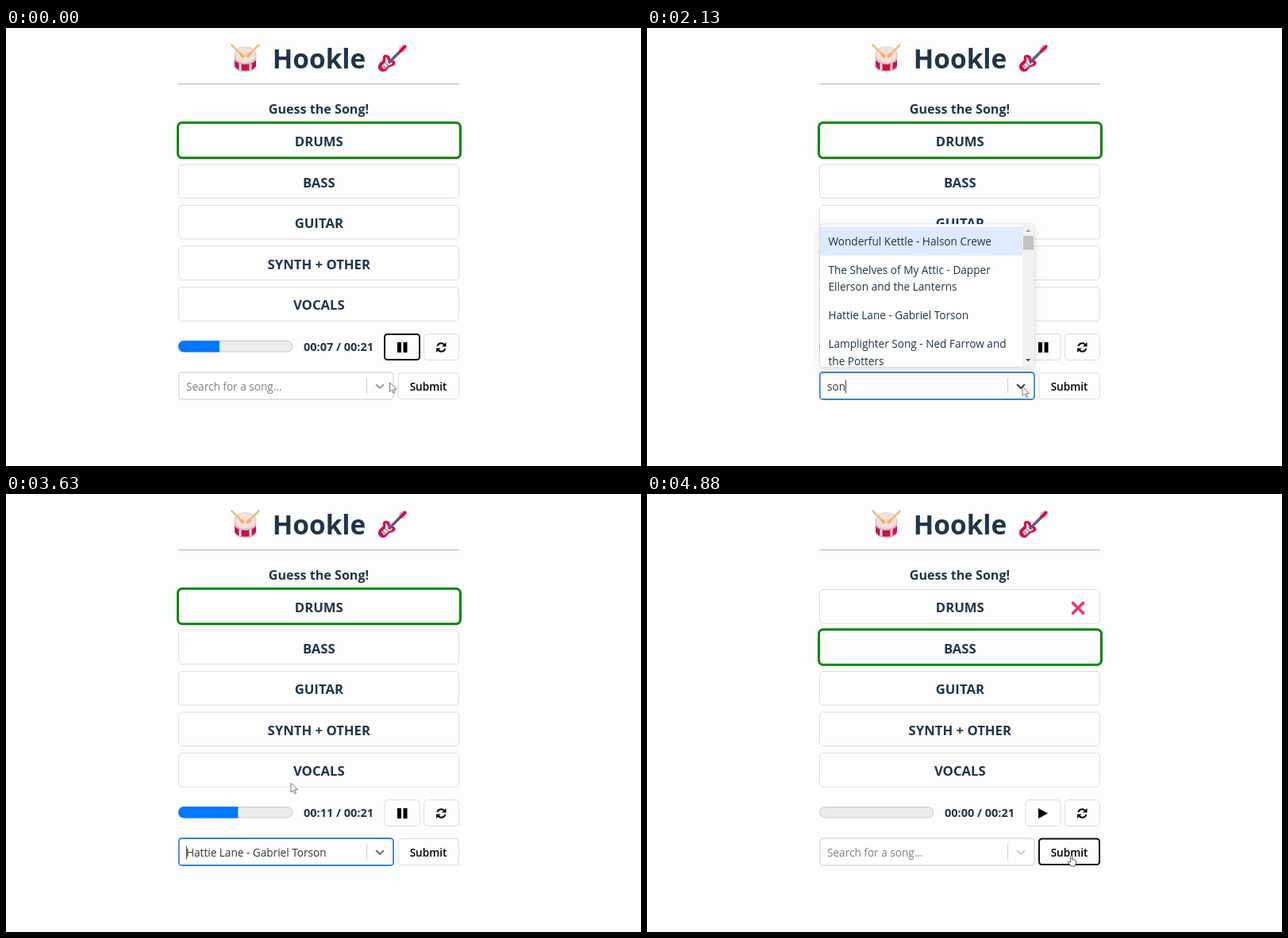
These frames come from a looping animation (800x552 px, 5.01 s). An HTML page:

```html
<!DOCTYPE html>
<html lang="en">
<head>
<meta charset="utf-8">
<title>Guess the Song</title>
<style>
  html, body { margin: 0; width: 100%; height: 100%; overflow: hidden; background: #fdfdfd; }
  svg { display: block; width: 800px; height: 552px; }
  text { font: 13.6px "Open Sans", "Noto Sans", sans-serif; fill: #213547; white-space: pre; }
  .mid { text-anchor: middle; }
  .title { font-size: 33.4px; font-weight: 700; }
  .sub { font-size: 16.1px; font-weight: 700; }
  .track { font-size: 16.7px; font-weight: 700; }
  .clock { font-size: 14.5px; font-weight: 700; }
  .submit { font-weight: 600; fill: #000; }
  .box { fill: #fdfdfd; stroke: #dedede; }
  .ring { fill: none; stroke: #0b860b; stroke-width: 3; }
  .focus { fill: none; stroke: #101010; stroke-width: 2; }
  .menu { fill: #fdfdfd; stroke: #00000018; filter: drop-shadow(0 3.6px 5px #0000001c); }
  .line { fill: none; stroke-linecap: round; stroke-linejoin: round; }
</style>
</head>
<body>
<svg viewBox="0 0 800 552">
  <defs>
    <clipPath id="barClip"><rect x="217" y="394" width="144.5" height="14.5" rx="7.2"/></clipPath>
    <clipPath id="listClip"><rect x="218" y="247" width="270" height="180.5" rx="3.6"/></clipPath>
    <g id="halfSync">
      <path d="M-5-1.4A5 5 0 0 1 3.6-3.5" fill="none" stroke="#000" stroke-width="2"/>
      <path d="M6.2-6.4V-.9H.7z"/>
    </g>
  </defs>

  <g id="drum">
    <path d="M288 36v12c2 9.5 25 9.5 27 0V36z" fill="#cd1144"/>
    <path d="M293.500 44l3 1.500v8l-3-1zM309.500 44l-3 1.500v8l3-1z" fill="#f6e4e6"/>
    <path d="M287.500 36v3c3 9 25 9 28 0v-3z" fill="#c6bfd0"/>
    <ellipse cx="301.5" cy="34" rx="14" ry="11" fill="#d6ccd6"/>
    <ellipse cx="301.5" cy="33.5" rx="12.5" ry="10" fill="#f6dfd9"/>
    <path d="M288 49c3 7.5 24 7.5 27 0" fill="none" stroke="#dccfd6" stroke-width="1.8"/>
    <path class="line" d="M284.500 21.500l13 13M318.500 21.500l-13 13" stroke="#f0bc80" stroke-width="2.6"/>
    <path class="line" d="M296.500 33.500l2 2M306.500 33.500l-2 2" stroke="#f3b068" stroke-width="4"/>
  </g>

  <g id="guitar">
    <path d="M480 34c-4-1-6 2-5 5 0 2-2 3-4 5-4 4-2 11 4 11 3 0 5-2 7-5 2-2 5-1 7-3 3-2 1-6-1-6-2 1-4 0-4-2 0-3-1-4-4-5z" fill="#d0124a"/>
    <path d="M478 37c2 0 3 2 3 4l6 3c-1 3-5 2-7 5l-4 3-3-4 5-5z" fill="#f3e1ea"/>
    <path d="M475 47l4 4M478 44l4 4" stroke="#8d7f9c" stroke-width="1.3"/>
    <path d="M482 44L498 28" stroke="#62527c" stroke-width="3.8"/>
    <path d="M482 43.500L498 27.500" stroke="#9a8caf" stroke-width=".8" stroke-dasharray="1.2 1.5"/>
    <path class="line" d="M497.500 28.500l5-5" stroke="#d0124a" stroke-width="4.4"/>
    <path class="line" d="M495.500 25.500l4.500-4M500.500 30.500l4-4.500" stroke="#6e6283" stroke-dasharray=".8 1.6"/>
  </g>

  <text class="mid title" x="394.5" y="50.7">Hookle</text>
  <path d="M217 70.500h354" stroke="#b5b5b5"/>
  <text class="mid sub" x="394" y="108.3">Guess the Song!</text>

  <g id="tracks"></g>
  <rect class="ring" id="ring" x="216.5" width="356" height="44.5" rx="5.5"/>
  <path id="cross" class="line" d="M536.500 137.300l13 13m0-13l-13 13" stroke="#ee3468" stroke-width="3.6"/>

  <g clip-path="url(#barClip)">
    <path d="M217 394h145v15h-145z" fill="#ececec"/>
    <rect x="217.5" y="394.5" width="143.5" height="13.5" rx="6.7" fill="none" stroke="#c6c6c6"/>
    <rect id="bar" x="217" y="394" height="15" fill="#0078fb"/>
  </g>
  <text class="clock" id="clock" x="375" y="406.7"></text>
  <rect class="box" x="477" y="385.5" width="44" height="33" rx="4"/>
  <rect class="focus" id="pauseFocus" x="477" y="386" width="44" height="32" rx="3.5"/>
  <path id="pause" d="M493 396h5v13h-5zM500.500 396h5v13h-5z"/>
  <path id="play" d="M493 396l12 6.500-12 6.500z"/>
  <rect class="box" x="526.5" y="385.5" width="44" height="33" rx="4"/>
  <use href="#halfSync" x="548.3" y="402.5"/>
  <use href="#halfSync" transform="translate(548.3 402.5) rotate(180)"/>

  <rect id="field" x="217.8" y="434" width="270.2" height="34" rx="3.6" fill="#fdfdfd"/>
  <path d="M454.500 441.500v19" stroke="#ccc"/>
  <path id="chevron" class="line" d="M466.700 449.700l4.300 4.200 4.300-4.200" stroke-width="2"/>
  <text id="entry" x="227" y="456.7"></text>
  <path id="caret" d="M.5 443.500v17" stroke="#444"/>
  <rect class="box" id="submit" x="494" y="434.5" width="76.5" height="33" rx="4"/>
  <text class="mid submit" x="532" y="457">Submit</text>
  <rect class="focus" id="submitFocus" x="494" y="434.5" width="76" height="32.5" rx="3.5"/>

  <g id="hint">
    <rect class="menu" x="217.5" y="383" width="271" height="44.5" rx="3.6"/>
    <text class="mid" x="353" y="410.7" style="fill:#999">Keep Typing!</text>
  </g>
  <g id="list">
    <rect class="menu" x="217.5" y="247" width="270.5" height="180.5" rx="3.6"/>
    <g clip-path="url(#listClip)">
      <rect id="hover" x="218" width="255" fill="#deeaff"/>
      <g id="options"></g>
      <path d="M473 247h15v181h-15z" fill="#f1f1f1"/>
      <path d="M474 262h13v17.500h-13z" fill="#c1c1c1"/>
      <path d="M477 257l3.200-3.500 3.200 3.500z" fill="#a3a3a3"/>
      <path d="M477 417l3.200 3.500 3.200-3.500z" fill="#505050"/>
    </g>
  </g>

  <g id="cursor" stroke="#555" stroke-width=".8" fill="#fff">
    <path id="arrow" d="M0 0v11.500l2.700-2.500 1.900 4.300 1.900-.8-1.800-4.200h3.800z"/>
    <path id="hand" stroke="#333" d="M-1 1c0-1.300 2-1.300 2 0v4l4 .8c1 .2 1.300.9 1.200 1.800l-.7 4-1 2h-5l-3.500-5c-.8-1 .5-1.800 1.300-1l1.700 1.300z"/>
  </g>
</svg>
<script>
const LOOP = 5010;
const CLICK = { open: 500, pick: 3500, press: 4380, submit: 4500 };
const KEYS = [1630, 1880, 2000];
const WORD = 'son';
const TRACKS = ['DRUMS', 'BASS', 'GUITAR', 'SYNTH + OTHER', 'VOCALS'];
const PICKED = 'Hattie Lane - Gabriel Torson';
const SONGS = [
  ['Wonderful Kettle - Halson Crewe'],
  ['The Shelves of My Attic - Dapper', 'Ellerson and the Lanterns'],
  [PICKED],
  ['Lamplighter Song - Ned Farrow and', 'the Potters']
];
// Pointer stops: time, x, y
const STOPS = [
  [0, 483.5, 447], [380, 473, 452], [2500, 473, 452], [3130, 351.5, 360.5],
  [3560, 351.5, 360.5], [4130, 531.5, 454], [4380, 534.5, 455.5], [LOOP, 534.5, 455.5]
];

const $ = id => document.getElementById(id);
const set = (id, attrs) => { for (const k in attrs) $(id).setAttribute(k, attrs[k]); };
const show = (id, on) => { $(id).style.display = on ? '' : 'none'; };

$('tracks').innerHTML = TRACKS.map((name, i) => {
  const y = 51.5 * i;
  return `<rect class="box" x="217.5" y="${120.5 + y}" width="353" height="42.5" rx="4.5"/>
    <text class="mid track" x="394.3" y="${149.3 + y}">${name}</text>`;
}).join('');

let rowY = 250.6;
const rows = SONGS.map(lines => {
  const row = { y: rowY, height: 14.4 + 21.6 * lines.length };
  rowY += row.height;
  $('options').innerHTML += lines.map((line, i) =>
    `<text x="228.5" y="${row.y + 23.2 + 21.6 * i}">${line}</text>`).join('');
  return row;
});

function pointer(t) {
  const i = STOPS.findIndex(s => s[0] > t);
  const [t0, x0, y0] = STOPS[i - 1], [t1, x1, y1] = STOPS[i];
  const u = (t - t0) / (t1 - t0), e = u * u * (3 - 2 * u);
  return [x0 + (x1 - x0) * e, y0 + (y1 - y0) * e];
}

// The picture advances eight times a second, on 10 ms marks
function snap(t) {
  const mark = n => Math.ceil(n * 12.5) * 10;
  const n = Math.min(39, Math.floor(t / 125));
  return mark(n) > t ? mark(n - 1) : mark(n);
}

function chevronColor(focused, hovered, picked) {
  if (focused) return hovered ? '#333' : '#666';
  return hovered || picked ? '#999' : '#ccc';
}

function render(t) {
  const done = t >= CLICK.submit;
  const opened = t >= CLICK.open && t < CLICK.pick;
  const picked = t >= CLICK.pick && !done;
  const focused = t >= CLICK.open && t < CLICK.press;
  const typed = opened ? WORD.slice(0, KEYS.filter(k => t >= k).length) : '';
  const full = typed === WORD;
  const [x, y] = pointer(t);

  set('ring', { y: done ? 170.7 : 119.2 });
  show('cross', done);
  show('play', done);
  show('pause', !done);
  show('pauseFocus', t < CLICK.open);
  set('bar', { width: done ? 0 : 52 + 6.42 * t / 1000 });
  const secs = done ? 0 : Math.floor(7.7 + t / 1000);
  $('clock').textContent = `00:${String(secs).padStart(2, '0')} / 00:21`;

  set('field', { stroke: focused ? '#3585d8' : '#ccc', 'stroke-width': focused ? 1.8 : 1 });
  set('chevron', { stroke: chevronColor(focused, x > 455 && x < 489, picked) });
  const entry = $('entry');
  entry.textContent = picked ? PICKED : typed || 'Search for a song...';
  entry.style.fill = picked || typed ? '#333' : '#808080';

  const inputAt = Math.max(...[CLICK.open, CLICK.pick, ...KEYS].filter(k => t >= k), 0);
  show('caret', focused && Math.floor((t - inputAt) / 530) % 2 === 0);
  const caretX = typed ? Math.round(entry.getComputedTextLength()) : 0;
  set('caret', { transform: `translate(${227 + caretX} 0)` });

  show('hint', opened && !full);
  show('list', opened && full);
  const over = x < 473 && y < 427 ? rows.findIndex(r => y >= r.y && y < r.y + r.height) : 0;
  const row = rows[Math.max(0, over)];
  set('hover', { y: row.y, height: row.height });

  const glow = 100 * Math.min(1, Math.max(0, (t - 4080) / 250));
  $('submit').style.stroke = `color-mix(in srgb, #646cff ${glow}%, #dedede)`;
  show('submitFocus', t >= CLICK.press);

  const onButton = x > 494;
  show('hand', onButton);
  show('arrow', !onButton);
  set('cursor', { transform: `translate(${x} ${y})` });
}

const start = performance.now();
function frame() {
  render(snap((performance.now() - start) % LOOP));
  requestAnimationFrame(frame);
}
frame();
</script>
</body>
</html>
```
